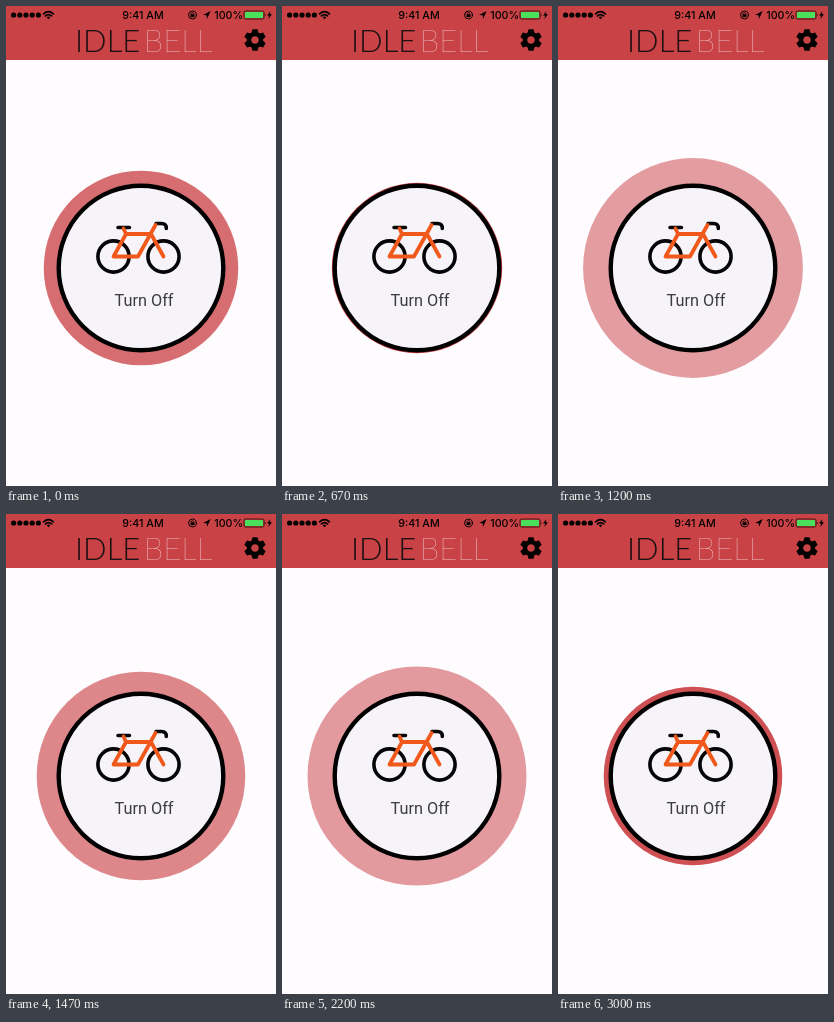
An HTML page for the animation above (3.07 s loop, 270 px wide and 480 px high).

```html
<!DOCTYPE html>
<html lang="en">
<head>
<meta charset="utf-8">
<title>Bike ride switch</title>
<style>
html, body { margin: 0; width: 100%; height: 100%; overflow: hidden; background: #fefcff; }
svg { display: block; width: 100vw; height: 100vh; }
.status { font: 500 10.7px Inter, sans-serif; }
.logo { font-family: Lato, sans-serif; font-size: 31px; }
.label { font: 16.3px Roboto, sans-serif; fill: #3c3c3e; }
.line { fill: none; stroke-linecap: round; stroke-linejoin: round; }
</style>
</head>
<body>
<svg viewBox="0 0 270 480" preserveAspectRatio="none">
  <rect width="270" height="480" fill="#fefcff"/>
  <rect width="270" height="54" fill="#c94245"/>

  <!-- status bar -->
  <g id="dots"></g>
  <g class="line" stroke="#000" stroke-width="1.7" stroke-linecap="butt">
    <path d="M37.6 7.8Q42.5 3.6 47.4 7.8M39.4 9.9Q42.5 7.3 45.6 9.9"/>
  </g>
  <path d="M42.5 13.2L40.7 11.3Q42.5 9.9 44.3 11.3Z"/>
  <text class="status" x="137" y="12.8" text-anchor="middle">9:41 AM</text>
  <g class="line" stroke="#000">
    <circle cx="186.5" cy="9" r="3.9" stroke-width="1"/>
    <path d="M185.2 8.4V7.5Q186.5 5.8 187.8 7.5V8.4" stroke-width=".8"/>
  </g>
  <rect x="184.6" y="8.3" width="3.8" height="2.8"/>
  <path d="M204.6 5L197.2 8.9L200.7 9.2L201 12.9Z"/>
  <text class="status" x="222.7" y="12.8" text-anchor="middle">100%</text>
  <rect x="238" y="5" width="20" height="8" rx="1.5" fill="none" stroke="#000" stroke-width=".7"/>
  <rect x="239" y="6" width="18" height="6" rx=".6" fill="#4be05c"/>
  <path d="M258.8 7.4Q260.4 9 258.8 10.6Z"/>
  <path d="M264.5 5L261 9.6H263.2L262.3 13L266 8.2H263.7Z"/>

  <!-- header -->
  <text class="logo" x="69" y="46" font-weight="300" fill="#1c1012">IDLE</text>
  <text class="logo" x="138" y="46" font-weight="100" fill="#fff">BELL</text>
  <g transform="translate(249 34)">
    <g id="teeth"></g>
    <circle r="5.9" fill="none" stroke="#000" stroke-width="4.2"/>
  </g>

  <!-- button -->
  <circle id="pulse" cx="135" cy="262" r="84.5" fill="#c93e42"/>
  <circle cx="135" cy="262" r="82.3" fill="#f6f4f8" stroke="#000" stroke-width="4.4"/>
  <g class="line" stroke="#050505" stroke-width="3.6">
    <circle cx="107.5" cy="250.5" r="15.6"/>
    <circle cx="157.5" cy="250.5" r="15.6"/>
    <path d="M112 221.5H123.5M150 217.5H155.5Q160.5 217.5 160.3 222.5"/>
  </g>
  <g class="line" stroke="#f1581c" stroke-width="3.8">
    <path d="M117.5 222.5L120 228L107.5 250.5H132L149.5 219M120 228H145L157.5 250.5"/>
  </g>
  <text class="label" x="138" y="300" text-anchor="middle">Turn Off</text>
</svg>
<script>
const NS = 'http://www.w3.org/2000/svg';
const LOOP = 3070, STEP = 200 / 3, LAST = 45;
const GROW = [0, 1000, 2035, 3070], SHRINK = [555, 1509, 2536];
const pulse = document.getElementById('pulse');

function add(parent, tag, attrs) {
  const el = document.createElementNS(NS, tag);
  for (const key in attrs) el.setAttribute(key, attrs[key]);
  document.getElementById(parent).appendChild(el);
}

for (let i = 0; i < 5; i++) add('dots', 'circle', { cx: 7.6 + i * 6.2, cy: 9, r: 2.6 });
for (let i = 0; i < 6; i++) {
  add('teeth', 'path', { d: 'M-3.8 -6L-2.5 -10.8H2.5L3.8 -6Z', transform: `rotate(${i * 60})` });
}

function ease(x) {
  x = Math.min(1, Math.max(0, x));
  return x < .5 ? 4 * x ** 3 : 1 - 4 * (1 - x) ** 3;
}

// Sum of eased ramps, each given by its midpoint
const ramps = (mids, len, t) => mids.reduce((sum, m) => sum + ease((t - m) / len + .5), 0);

function draw(ms) {
  const step = Math.min(LAST, Math.floor((ms % LOOP + 1) / STEP));
  const t = step * STEP;
  const p = ramps(GROW, 500, t) - ramps(SHRINK, 360, t);
  pulse.setAttribute('r', 84.5 + 25.5 * p);
  pulse.setAttribute('opacity', 1 - .5 * p);
}

const start = performance.now();
function tick() {
  draw(performance.now() - start);
  requestAnimationFrame(tick);
}
tick();
</script>
</body>
</html>
```
